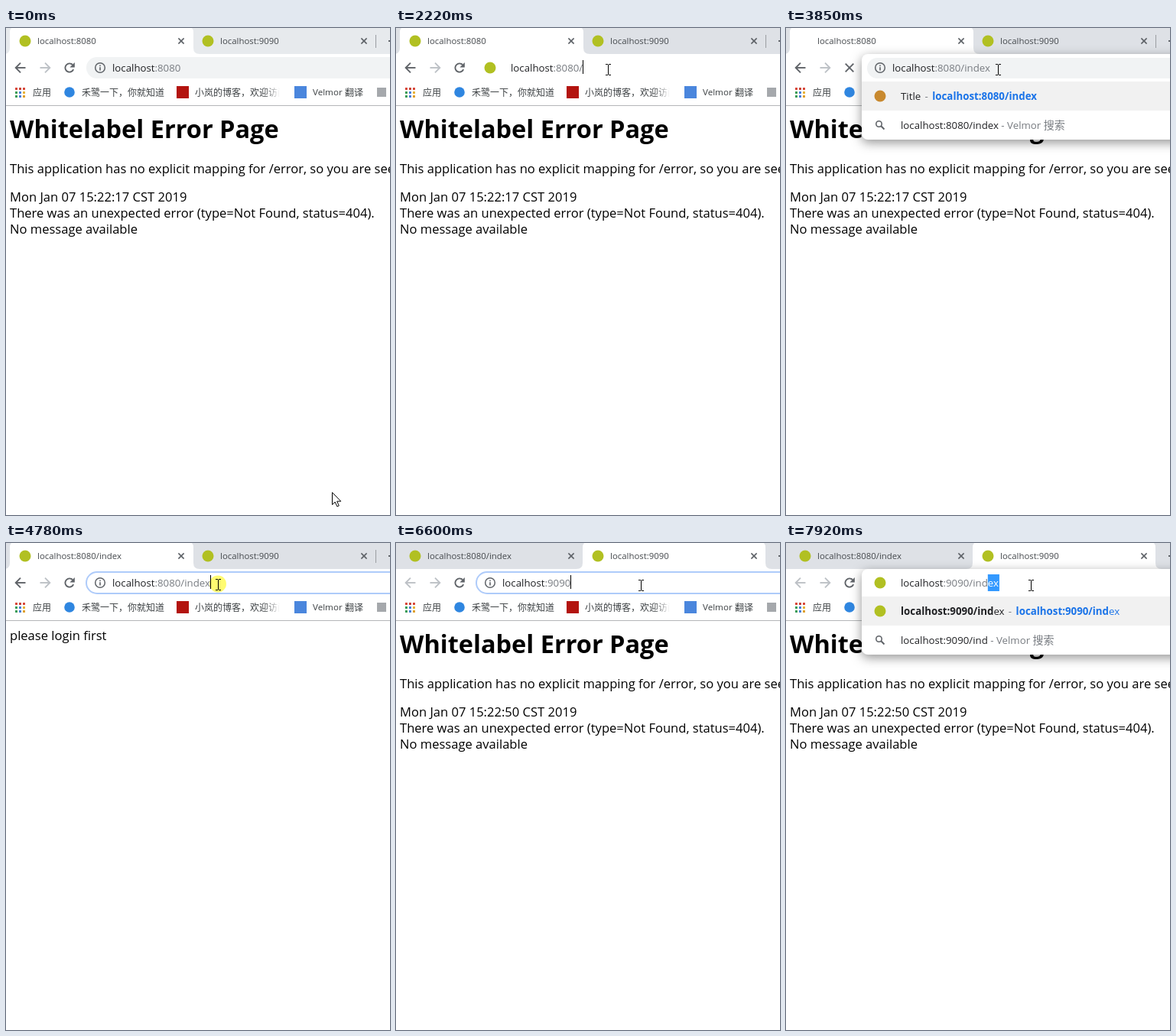
An HTML page with a canvas that plays this animation: 502x637 px, repeating every 8 s.

```html
<!DOCTYPE html>
<html lang="zh">
<head>
<meta charset="utf-8">
<style>
html, body { margin: 0; width: 100%; height: 100%; overflow: hidden; background: #fff; }
canvas { display: block; }
</style>
</head>
<body>
<canvas id="c" width="502" height="637"></canvas>
<script>
const g = document.getElementById('c').getContext('2d');
const LOOP = 8000;
const SANS = '"Open Sans", "Noto Sans", "Noto Sans CJK SC", sans-serif';
const CJK = '"Noto Sans CJK SC", "Noto Sans CJK", sans-serif';
const INK = '#202124', GREY = '#777b80', ICON = '#5f6368', PALE = '#bdc1c6';
const BLUE = '#1a73e8', SELECT = '#3399ff', LEAF = '#b1c022', AMBER = '#c8892f';

// ---- helpers ----
function text(s, x, y, size, color, weight = 400, family = SANS) {
  g.font = `${weight} ${size}px ${family}`;
  g.fillStyle = color;
  g.fillText(s, x, y);
  return x + g.measureText(s).width;
}

// Asterisks switch bold on and off
function rich(s, x, y, color) {
  s.split('*').forEach((part, i) => { x = text(part, x, y, 13.3, color, i % 2 ? 700 : 400); });
  return x;
}

function rect(x, y, w, h, color) {
  g.fillStyle = color;
  g.fillRect(x, y, w, h);
}

function disc(x, y, r, color) {
  g.fillStyle = color;
  g.beginPath();
  g.arc(x, y, r, 0, 7);
  g.fill();
}

function line(color, width, ...pts) {
  g.strokeStyle = color;
  g.lineWidth = width;
  g.beginPath();
  for (let i = 0; i < pts.length; i += 2) g.lineTo(pts[i], pts[i + 1]);
  g.stroke();
}

function poly(color, ...pts) {
  g.fillStyle = color;
  g.beginPath();
  for (let i = 0; i < pts.length; i += 2) g.lineTo(pts[i], pts[i + 1]);
  g.closePath();
  g.fill();
}

function pill(x, y, w, h, r) {
  g.beginPath();
  g.roundRect(x, y, w, h, r);
}

function cross(x, y, r, color, width) {
  line(color, width, x - r, y - r, x + r, y + r);
  line(color, width, x + r, y - r, x - r, y + r);
}

// ---- icons ----
function arrow(x, y, dir, color) {
  line(color, 1.9, x - 6.5 * dir, y, x + 6 * dir, y);
  line(color, 1.9, x, y - 6.3, x + 6.3 * dir, y, x, y + 6.3);
}

function reload(x, y) {
  g.strokeStyle = ICON;
  g.lineWidth = 1.9;
  g.beginPath();
  g.arc(x, y, 5.6, 0.4, 5.5);
  g.stroke();
  poly(ICON, x + 6.8, y - 7, x + 6.8, y - 0.6, x + 0.4, y - 0.6);
}

function info(x, y) {
  g.strokeStyle = ICON;
  g.lineWidth = 1.5;
  g.beginPath();
  g.arc(x, y, 6.3, 0, 7);
  g.stroke();
  rect(x - 0.8, y - 3.5, 1.6, 1.6, ICON);
  rect(x - 0.8, y - 0.8, 1.6, 4.3, ICON);
}

function globe(x, y) {
  disc(x, y, 6.7, ICON);
  poly('#fff', x - 5, y - 2, x - 1, y, x + 1, y + 3, x - 1, y + 5, x - 4.5, y + 2);
  poly('#fff', x, y - 5, x + 4, y - 3.5, x + 5, y, x + 2.5, y + 1, x + 1.5, y - 1.5, x - 1, y - 2.5);
}

function lens(x, y) {
  g.strokeStyle = ICON;
  g.lineWidth = 1.6;
  g.beginPath();
  g.arc(x - 1.5, y - 1.5, 3.7, 0, 7);
  g.stroke();
  line(ICON, 2, x + 1.3, y + 1.3, x + 5.5, y + 5.5);
}

const icons = {
  globe, lens,
  leaf: (x, y) => disc(x, y, 7.5, LEAF),
  amber: (x, y) => disc(x, y, 7.5, AMBER),
};

// ---- pointer ----
// start, end, steps, target x, target y
const moves = [
  [70, 370, 5, 121, 47], [530, 530, 1, 256, 50], [1000, 1160, 3, 277, 54],
  [5010, 5250, 4, 322, 16], [5570, 5800, 4, 320, 46], [5880, 6040, 3, 320, 55],
];
const clicks = [[690, 770], [1160, 1320], [4780, 4860], [5330, 5410], [6120, 6200], [6440, 6520]];
const within = (t, a, b) => t >= a && t < b;

function pointerAt(t) {
  let x = 426, y = 607;
  for (const [a, b, n, tx, ty] of moves) {
    if (t < a) break;
    const k = n === 1 ? 1 : Math.min(n, Math.floor((t - a) * (n - 1) / (b - a) + 0.001) + 1) / n;
    const e = k * k * (3 - 2 * k);
    x += (tx - x) * e;
    y += (ty - y) * e;
  }
  return { x: Math.round(x), y: Math.round(y) };
}

function drawPointer(t, { x, y }) {
  if (clicks.some(([a, b]) => within(t, a, b))) {
    g.globalCompositeOperation = 'multiply';
    disc(x, y - 0.5, 11, '#fffb70');
    g.globalCompositeOperation = 'source-over';
  }
  if (y > 38 && y < 66) {
    rect(x, y - 6, 1, 13, '#000');
    rect(x - 3, y - 7, 3, 1, '#000');
    rect(x + 1, y - 7, 3, 1, '#000');
    rect(x - 3, y + 7, 3, 1, '#000');
    rect(x + 1, y + 7, 3, 1, '#000');
    return;
  }
  const p = [0, 0, 0, 16, 3.7, 12.5, 6.4, 18.4, 8.8, 17.4, 6.2, 11.6, 11.3, 11.6]
    .map((v, i) => v + (i % 2 ? y : x) + 0.5);
  poly('#fff', ...p);
  line('#000', 1, ...p, p[0], p[1]);
}

// ---- page ----
function drawPage(t) {
  rect(0, 0, 502, 637, '#fff');
  const put = (s, y) => text(s, 5, y, 16.56, '#000');
  if (within(t, 3930, 5330)) {
    put('please login first', 127);
    return;
  }
  text('Whitelabel Error Page', 5, 144, 32.5, '#000', 700);
  put('This application has no explicit mapping for /error, so you are seeing this as a fallback.', 190);
  put(`Mon Jan 07 15:22:${t < 5330 ? 17 : 50} CST 2019`, 227);
  put('There was an unexpected error (type=Not Found, status=404).', 248);
  put('No message available', 269);
}

// ---- browser frame ----
function drawTabs(t, tab, ptr) {
  rect(0, 0, 502, 34, t < 690 ? '#e7eaed' : '#dee1e6');
  if (tab === 1 && ptr.y < 34) rect(246, 0, 237, 34, '#eaecef');
  const a = tab === 1 ? 5 : 244, b = tab === 1 ? 245 : 483;
  g.fillStyle = '#fff';
  g.beginPath();
  g.moveTo(a - 8, 34);
  g.quadraticCurveTo(a, 34, a, 26);
  g.lineTo(a, 6);
  g.quadraticCurveTo(a, -2, a + 8, -2);
  g.lineTo(b - 8, -2);
  g.quadraticCurveTo(b, -2, b, 6);
  g.lineTo(b, 26);
  g.quadraticCurveTo(b, 34, b + 8, 34);
  g.fill();
  if (tab === 1) rect(483, 9, 1, 17, '#9a9da1');
  rect(500, 16, 2, 2, ICON);

  if (!within(t, 3850, 4010)) icons.leaf(25, 17);
  icons.leaf(264, 17);
  text(t < 3930 ? 'localhost:8080' : 'localhost:8080/index', 41, 21, 11.4, '#45494d');
  text('localhost:9090', 280, 21, 11.4, '#45494d');
  cross(229, 17, 3.6, ICON, 1.6);
  cross(468, 17, 3.6, ICON, 1.6);
}

function drawBars(t, tab) {
  rect(0, 34, 502, 67, '#fff');
  rect(0, 101, 502, 1, '#b4b6b8');
  arrow(19, 52, -1, tab === 1 ? ICON : PALE);
  arrow(51, 52, 1, PALE);
  if (within(t, 3850, 4010)) cross(83, 52, 5.3, ICON, 1.9);
  else reload(83, 52);

  const dots = ['#d9483b', '#c9463a', '#d9483b', '#3c9d58', '#4a7fd8', '#e8b33a', '#3c9d58', '#4a7fd8', '#e0a030'];
  dots.forEach((c, i) => rect(12 + i % 3 * 5, 78 + Math.floor(i / 3) * 5, 3, 3, c));
  const ink = '#3c4043', cn = (s, x, c = ink) => text(s, x, 88.5, 12, c, 400, CJK);
  cn('应用', 35);
  disc(83, 84, 6.8, '#2f86e0');
  cn('禾鹭一下，你就知道', 99);
  rect(223, 76, 16, 16, '#b3140f');
  const fade = g.createLinearGradient(338, 0, 358, 0);
  fade.addColorStop(0, ink);
  fade.addColorStop(1, 'rgba(60,64,67,0)');
  cn('小岚的博客，欢迎访问', 247, fade);
  rect(377, 76, 16, 16, '#4a86dd');
  text('Velmor', 401, 88, 11.6, ink);
  cn('翻译', 443);
  rect(485, 78, 12, 12, '#a5a8ac');
}

// ---- address field ----
function address(x, s, opt = {}) {
  const host = 'localhost', rest = s.slice(host.length);
  if (opt.all) {
    g.font = `400 13.25px ${SANS}`;
    rect(x, 42, g.measureText(s).width, 20, SELECT);
    text(s, x, 57, 13.25, '#fff');
    return;
  }
  let end = text(host, x, 57, 13.25, INK);
  end = text(rest, end, 57, 13.25, GREY);
  if (opt.under) {
    const w = g.measureText(opt.under).width;
    rect(end - w, 59, w, 1, INK);
  }
  if (opt.tail) {
    const w = g.measureText(opt.tail).width;
    rect(end, 41, w + 1, 22, SELECT);
    text(opt.tail, end, 57, 13.25, '#fff');
  } else if (opt.caret) {
    rect(Math.round(end), 42, 1, 18, '#000');
  }
}

function drawField(t, base) {
  const focused = within(t, 690, 2220) || within(t, 4780, 5330) || t >= 6120;
  pill(105, 38, 440, 28, 14);
  if (focused) {
    g.strokeStyle = '#aecbfa';
    g.lineWidth = 2;
    g.stroke();
  } else {
    g.fillStyle = '#f1f3f4';
    g.fill();
  }
  info(123, 52);
  address(139, base + (within(t, 3850, 5330) ? '/index' : ''), {
    all: within(t, 770, 1080) || within(t, 4860, 5330) || within(t, 6200, 6440),
    caret: focused && !within(t, 1710, 2220) && !within(t, 6910, 7060),
  });
}

// ---- suggestions ----
const rows8080 = [
  ['globe', '', '/'],
  ['globe', 'Title', '/index.html'],
  ['globe', 'Swagger UI', '/swagger-ui.html'],
  ['leaf', 'Hello', '/include'],
  ['leaf', 'T*i*tle', '/index'],
  ['globe', 'Hello', '/if'],
];
const rows9090 = [
  ['leaf', '', '/'],
  ['leaf', 'localhost:9090/index', '/index'],
  ['leaf', 'Hello', '/hello'],
  ['leaf', 'Title', '/login'],
];

function drawPopup(base, typed, rows) {
  g.save();
  g.shadowColor = 'rgba(0,0,0,.42)';
  g.shadowBlur = 14;
  g.shadowOffsetY = 4;
  g.fillStyle = '#fff';
  pill(99, 34, 430, 36 + rows.length * 38, 8);
  g.fill();
  g.restore();
  rect(99, 70, 403, 38, '#f1f1f1');

  const full = base + typed;
  const mark = s => {
    let n = s.startsWith(full) ? full.length : s.startsWith(base + '/') ? base.length + 1 : 0;
    return n ? `*${s.slice(0, n)}*${s.slice(n)}` : s;
  };
  rows.forEach(([icon, title, path], i) => {
    const y = 89 + i * 38, b = y + 5;
    icons[icon](123, y);
    if (icon === 'lens') {
      let x = text(full, 150, b, 13.25, INK);
      x = text(' - Velmor ', x, b, 13.25, GREY);
      text('搜索', x, b, 14, GREY, 400, CJK);
      return;
    }
    let x = 150;
    if (title) {
      x = rich(mark(title), x, b, INK);
      text('-', x + 5.2, b, 13.25, GREY);
      x += 15;
    }
    rich(mark(base + path), x, b, BLUE);
  });
}

// ---- input method window ----
const words = ['indeed', 'index', 'industry', 'individual', 'industrial', 'indent', 'indebted',
  'indefinite', 'indexed', 'indexes', 'indexing', 'indexer'];

function drawIme(s) {
  rect(251, 63, 136, 151, '#2f8fe0');
  rect(252, 64, 134, 149, '#f7f7f7');
  const end = text(s, 261, 81, 14.6, '#555');
  rect(Math.round(end), 68, 1, 17, '#333');
  rect(258, 89, 121, 1, '#d0d0d0');
  poly('#cfcfcf', 360, 71, 360, 81, 355, 76);
  rect(367, 68, 14, 16, '#fff');
  poly('#58aef0', 371.5, 71, 371.5, 81, 376.5, 76);
  words.filter(w => w.startsWith(s)).slice(0, 5).forEach((w, i) =>
    text(`${i + 1}.${w}`, 265, 113 + i * 22, 13.5, i ? '#666' : '#2f8fe0', 400, '"Liberation Mono", monospace'));
}

// ---- editing states ----
function drawEdit8080(t) {
  const base = 'localhost:8080';
  const n = t < 2830 ? 0 : Math.min(5, Math.max(1, Math.floor((t - 2990) / 80) + 1));
  const part = 'index'.slice(0, n), typed = '/' + part, done = t >= 3310;
  if (t >= 2300) {
    drawPopup(base, typed, done ? [['amber', 'Title', '/index'], ['lens', '', '']] : rows8080);
  } else {
    rect(100, 36, 402, 32, '#fff');
  }
  if (t >= 3850) {
    pill(106, 39, 440, 27, 13.5);
    g.fillStyle = '#f1f3f4';
    g.fill();
    info(123, 52);
    address(139, base + typed);
    return;
  }
  icons[t < 2300 ? 'leaf' : done ? 'amber' : 'globe'](123, 52);
  const composing = within(t, 2750, 3460);
  address(150, base + typed, { caret: true, under: composing && part });
  if (composing) drawIme('index'.slice(0, Math.floor((t - 2750) / 80) + 1));
}

function drawEdit9090(t) {
  const base = 'localhost:9090';
  const n = t < 7760 ? 0 : Math.min(3, Math.floor((t - 7760) / 80) + 1);
  const typed = '/' + 'index'.slice(0, n);
  if (t >= 7140) drawPopup(base, typed, n ? [rows9090[1], ['lens', '', '']] : rows9090);
  else rect(100, 36, 402, 32, '#fff');
  icons.leaf(123, 52);
  address(150, base + typed, { caret: true, tail: n ? 'index'.slice(n) : '' });
}

function draw(t) {
  const tab = t < 5330 ? 1 : 2, ptr = pointerAt(t);
  drawPage(t);
  drawTabs(t, tab, ptr);
  drawBars(t, tab);
  if (within(t, 2220, 3930)) drawEdit8080(t);
  else if (t >= 7060) drawEdit9090(t);
  else drawField(t, tab === 1 ? 'localhost:8080' : 'localhost:9090');
  drawPointer(t, ptr);
}

const start = performance.now();
function tick() {
  draw((performance.now() - start) % LOOP);
  requestAnimationFrame(tick);
}
tick();
</script>
</body>
</html>
```
